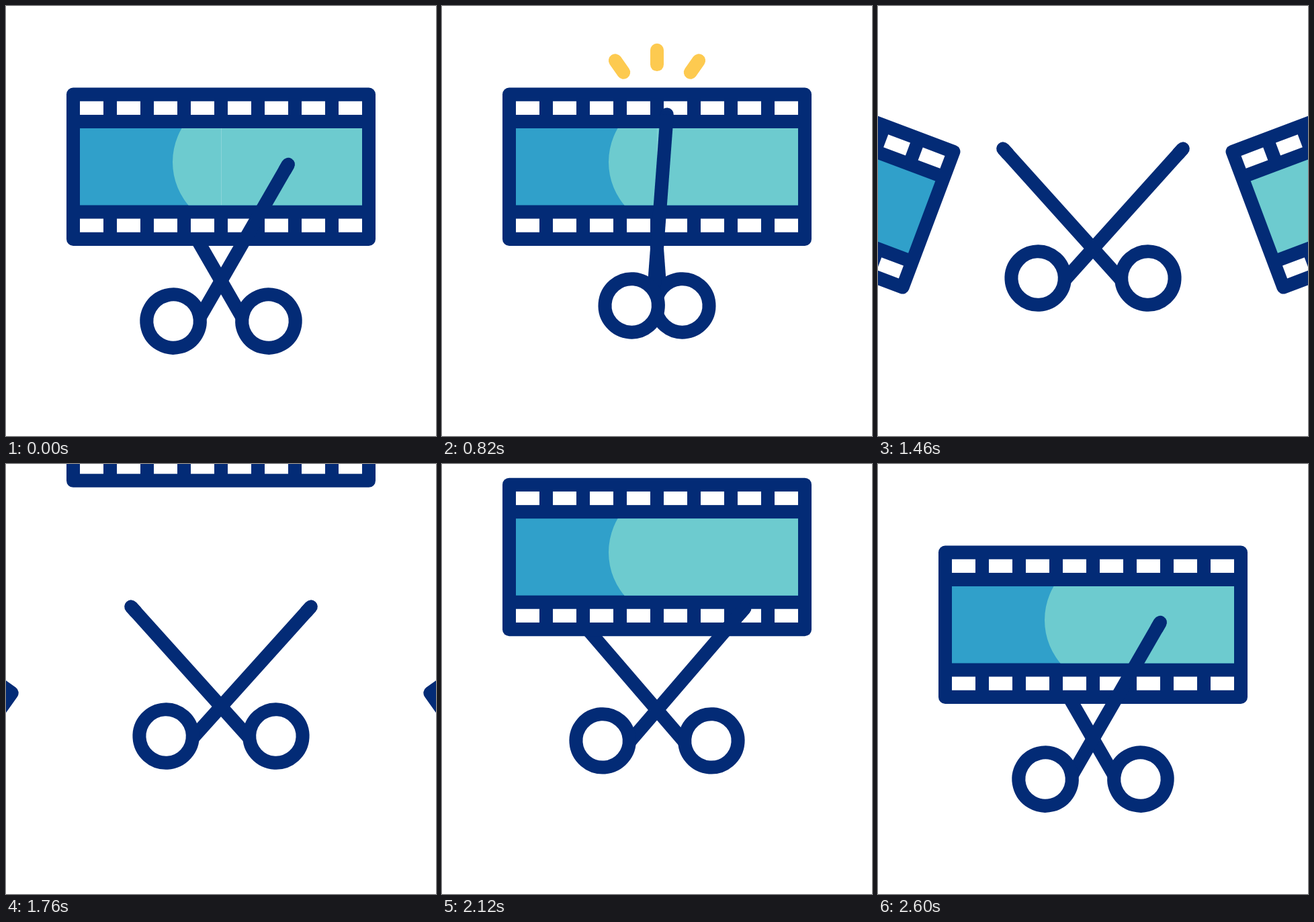
An HTML page with a canvas that plays this animation: 640 by 640 pixels, repeating every 3 s.

```html
<!DOCTYPE html>
<html lang="en">
<head>
<meta charset="utf-8">
<title>Film cut</title>
<style>
  html, body { margin: 0; width: 100%; height: 100%; overflow: hidden; background: #fff; }
  canvas { display: block; }
</style>
</head>
<body>
<canvas id="stage" width="640" height="640"></canvas>
<script>
const ctx = document.getElementById('stage').getContext('2d');
const LOOP = 3000;
const NAVY = '#032b76', BLUE = '#30a0ca', TEAL = '#6dcbcf', YELLOW = '#fdca50';
const MID_X = 320, FILM_Y = 239.25, CUT = 900;

// Ease-in-out progress between two times
function ease(t, from, to) {
  const u = Math.min(1, Math.max(0, (t - from) / (to - from)));
  return u * u * (3 - 2 * u);
}
const mix = (a, b, k) => a + (b - a) * k;

function placed(x, y, angle, draw) {
  ctx.save();
  ctx.translate(x, y);
  ctx.rotate(angle * Math.PI / 180);
  draw();
  ctx.restore();
}

function line(x1, y1, x2, y2, color, cap) {
  ctx.strokeStyle = color;
  ctx.lineWidth = 20;
  ctx.lineCap = cap;
  ctx.beginPath();
  ctx.moveTo(x1, y1);
  ctx.lineTo(x2, y2);
  ctx.stroke();
}

// Film body around the origin with two rows of holes
function filmBody(holes, picture) {
  const w = holes * 55 + 20, left = -w / 2;
  ctx.fillStyle = NAVY;
  ctx.beginPath();
  ctx.roundRect(left, -117.75, w, 235.5, 10);
  ctx.fill();
  ctx.fillStyle = '#fff';
  for (let i = 0; i < holes; i++) {
    ctx.fillRect(left + 20 + i * 55, -97.5, 35, 20.2);
    ctx.fillRect(left + 20 + i * 55, 77.3, 35, 20.2);
  }
  ctx.fillStyle = picture;
  ctx.fillRect(left + 20, -57.2, w - 40, 114.4);
}

function wholeFilm(offset, seam) {
  placed(MID_X, FILM_Y + offset, 0, () => {
    filmBody(8, BLUE);
    ctx.beginPath();
    ctx.rect(-210, -57.2, 420, 114.4);
    ctx.clip();
    ctx.fillStyle = TEAL;
    ctx.beginPath();
    ctx.arc(28, -7, 100, 0, Math.PI * 2);
    ctx.rect(28, -60, 190, 120);
    ctx.fill();
    if (seam) {
      ctx.fillStyle = 'rgba(255,255,255,.2)';
      ctx.fillRect(0, -57.2, 1, 114.4);
    }
  });
}

// The two halves fly apart along mirrored curves
function filmHalves(t) {
  const e = ease(t, CUT, 2000);
  const dx = e * (523.8 - 89.4 * e - 56 * e * e);
  const dy = e * (-87.5 + 400 * e - 156 * e * e);
  for (const side of [-1, 1]) {
    placed(MID_X + side * (110 + dx), FILM_Y + dy, -side * 40 * e,
      () => filmBody(4, side < 0 ? BLUE : TEAL));
  }
}

function scissorHalf(side, pivotY, angle) {
  placed(MID_X, pivotY, side * angle, () => {
    line(0, -200, 0, -190, NAVY, 'round');
    line(0, -200, 0, 62.5, NAVY, 'butt');
    ctx.fillStyle = '#fff';
    ctx.beginPath();
    ctx.arc(-side * 31.4, 87.5, 39.7, 0, Math.PI * 2);
    ctx.fill();
    ctx.stroke();
  });
}

function rays(t) {
  if (t <= 700 || t >= 1100) return;
  const head = 62.5 * ease(t, 700, 1000);
  const tail = 62.5 * ease(t, 800, 1100);
  for (const angle of [-35, 0, 35]) {
    const base = angle ? 86 : 82;
    placed(MID_X, 170, angle,
      () => line(0, -base - tail, 0, -base - head, YELLOW, 'round'));
  }
}

function scissorAngle(t) {
  if (t < 500) return mix(30, 42, ease(t, 200, 500));
  if (t < CUT) return mix(42, 0, ease(t, 500, CUT));
  if (t < 2000) return mix(0, 42, ease(t, CUT, 1300));
  return mix(42, 30, ease(t, 2000, 2600));
}

function render(t) {
  ctx.fillStyle = '#fff';
  ctx.fillRect(0, 0, 640, 640);
  const pivotY = 409 - 48 * (ease(t, 200, 500) - ease(t, 2000, 2600));
  const angle = scissorAngle(t);
  scissorHalf(-1, pivotY, angle);
  if (t < CUT) {
    wholeFilm(0, true);
  } else {
    if (t < 2000) filmHalves(t);
    if (t > 1600) wholeFilm(-360 * (1 - ease(t, 1600, 2400)), false);
  }
  rays(t);
  scissorHalf(1, pivotY, angle);
}

const start = performance.now();
function tick() {
  render((performance.now() - start) % LOOP);
  requestAnimationFrame(tick);
}
tick();
</script>
</body>
</html>
```
